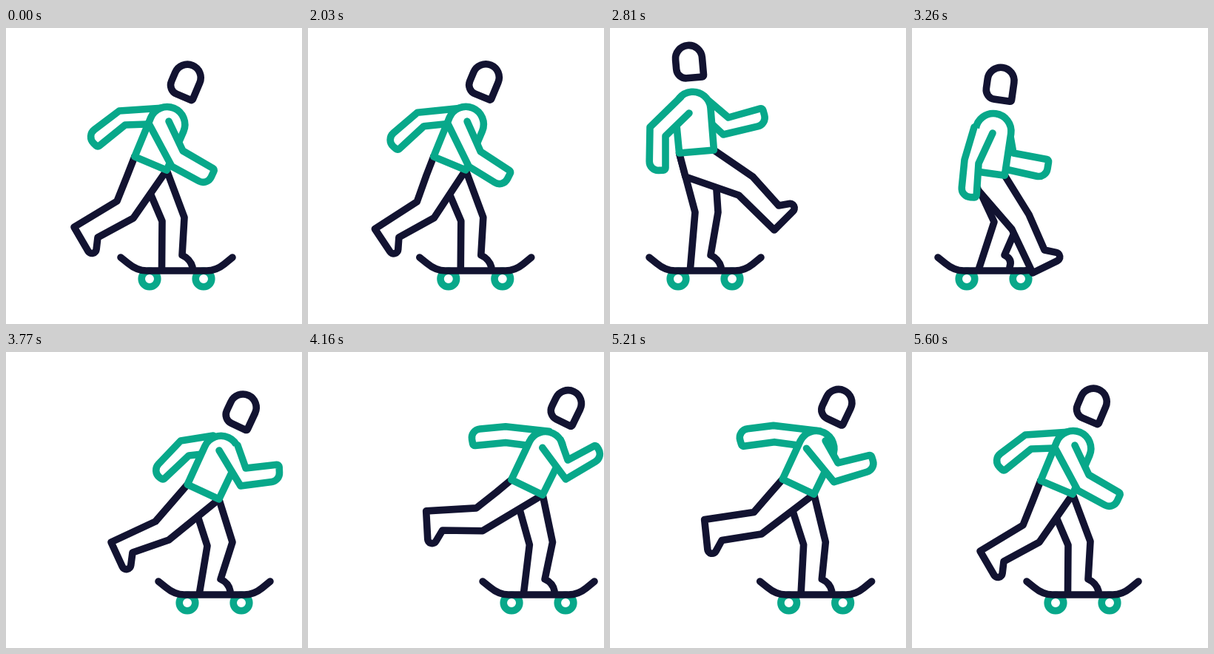
Recreate the animation shown at these times as an HTML page with a canvas. Size 400 by 400 pixels, loop 5660 ms.

```html
<!DOCTYPE html>
<html lang="en">
<head>
<meta charset="utf-8">
<title>Skateboarder</title>
<style>
  html, body { margin: 0; width: 100%; height: 100%; overflow: hidden; background: #fff; }
  canvas { display: block; width: 400px; height: 400px; }
</style>
</head>
<body>
<canvas id="stage" width="400" height="400"></canvas>
<script>
const ctx = document.getElementById('stage').getContext('2d');
const DARK = '#121331', GREEN = '#08a88a';
const LOOP = 5660, MOVE_START = 2030, MOVE_END = 5600, STEP = 30;
const CYCLE = 5;
const TORSO = 57, SHOULDER = 24, HIP = 23.5;

// Monotone cubic through (keys, values).
function spline(keys, values) {
  const last = keys.length - 1;
  const slope = i => (values[i + 1] - values[i]) / (keys[i + 1] - keys[i]);
  const tangents = keys.map((_, i) => {
    if (i === 0) return slope(0);
    if (i === last) return slope(last - 1);
    const a = slope(i - 1), b = slope(i);
    return a * b > 0 ? 2 * a * b / (a + b) : 0;
  });
  return x => {
    let i = 0;
    while (i < last - 1 && x >= keys[i + 1]) i++;
    const h = keys[i + 1] - keys[i], u = (x - keys[i]) / h, v = 1 - u;
    return v * v * (1 + 2 * u) * values[i] + u * v * v * h * tangents[i]
      + u * u * (3 - 2 * u) * values[i + 1] - u * u * v * h * tangents[i + 1];
  };
}

// Cyclic track of number rows, one row per key phase.
function track(phases, rows) {
  const n = phases.length;
  const keys = [phases[n - 1] - CYCLE, ...phases, CYCLE, phases[1] + CYCLE];
  const wrapped = [rows[n - 1], ...rows, rows[0], rows[1]];
  const curves = rows[0].map((_, c) => spline(keys, wrapped.map(row => row[c])));
  return p => curves.map(curve => curve(p));
}

const pairs = list => list.flatMap((x, i) => i % 2 ? [] : [[x, list[i + 1]]]);

const phaseAt = spline(
  [2000, 2570, 2810, 3140, 3260, 3770, 4280, 4730, 4880, 5420, 5600],
  [0, 0.85, 1, 1.27, 2, 3, 3.8, 4, 4.07, 4.72, 5]);
const boardAt = spline(
  [2000, 2300, 2570, 2810, 3070, 3260, 3440, 3600, 3770, 4000, 4350, 4730, 5080, 5420, 5600],
  [0, -42, -76, -102, -126, -120, -55, 18, 51, 74, 85, 80, 58, 27, 0]);

// Poses are in board coordinates: stride, kick, touch, push, glide.
const POSES = [0, 1, 2, 3, 4];
const bodies = [
  [195.5, 183, 23], [219, 167, -5], [222, 196, 8], [215.5, 189, 25], [214.5, 181.5, 26]
];
const bodyAt = track(POSES, bodies);

function shoulderOf([x, y, lean]) {
  const a = lean * Math.PI / 180;
  return [x + TORSO * Math.sin(a), y - TORSO * Math.cos(a)];
}

// Arms swing: elbow and hand points turn about the shoulder, ends just slide.
function armTrack(rows) {
  const isEnd = i => i === 0 || i === 5;
  const polar = track(POSES, rows.map((row, k) => {
    const [sx, sy] = shoulderOf(bodies[k]);
    return pairs(row).flatMap(([x, y], i) => {
      const dx = x - sx, dy = y - sy;
      return isEnd(i) ? [dx, dy] : [Math.atan2(dx, dy), Math.hypot(dx, dy)];
    });
  }));
  return (p, [sx, sy]) => pairs(polar(p)).map(([a, b], i) =>
    isEnd(i) ? [sx + a, sy + b] : [sx + b * Math.sin(a), sy + b * Math.cos(a)]);
}

// Shoulder end, elbow, hand, then back along the inner side.
const nearArmAt = armTrack([
  [194, 131, 224, 187, 272, 213, 282, 191, 239, 166, 220, 126],
  [198, 93, 156, 134, 155, 193, 177, 192, 177, 146, 209, 115],
  [204, 134, 191, 178, 186, 228, 207, 229, 210, 183, 229, 142],
  [237, 133, 266, 181, 319, 174, 318, 152, 273, 157, 262, 126],
  [234, 129, 267, 170, 316, 137, 305, 122, 269, 144, 258, 117]
]);
const farArmAt = armTrack([
  [213, 108, 153, 112, 108, 146, 124, 161, 161, 131, 190, 130],
  [240, 130, 255, 144, 314, 130, 308, 108, 262, 121, 235, 98],
  [225, 140, 238, 189, 301, 203, 305, 178, 257, 169, 251, 135],
  [229, 113, 185, 120, 146, 161, 161, 173, 196, 140, 214, 138],
  [250, 106, 185, 97, 137, 95, 139, 118, 183, 119, 216, 123]
]);

// Seat, back of knee, heel, toe, ankle, front of knee.
const nearLegAt = track([0, 0.5, 1, 2, 2.4, 3, 4], [
  [164, 199, 150, 234, 92, 269, 120, 317, 124, 283, 172, 257],
  [178, 200, 222, 240, 192, 292, 243, 306, 215, 275, 252, 225],
  [204, 201, 276, 226, 324, 273, 363, 234, 330, 240, 295, 201],
  [210, 220, 255, 272, 283, 331, 332, 307, 299, 300, 278, 252],
  [205, 222, 212, 272, 200, 345, 245, 362, 222, 325, 238, 262],
  [177, 199, 151, 229, 91, 257, 115, 309, 120, 271, 169, 254],
  [172, 188, 146, 208, 77, 208, 77, 266, 98, 236, 153, 239]
]);
// Back of knee, front of knee, ankle.
const farLegAt = track(POSES, [
  [211, 261, 241, 256, 238, 307],
  [217, 249, 248, 249, 238, 307],
  [231, 262, 262, 268, 245, 307],
  [221, 262, 255, 257, 239, 307],
  [217, 260, 247, 257, 239, 307]
]);

function paint(path, color, fill = '#fff') {
  ctx.strokeStyle = color;
  ctx.fillStyle = fill;
  ctx.beginPath();
  path();
  if (fill) ctx.fill();
  ctx.stroke();
}

// Open outline; radii maps a point index to its corner radius.
function outline(points, radii = {}) {
  points.forEach(([x, y], i) => {
    if (i === 0) ctx.moveTo(x, y);
    else if (radii[i]) ctx.arcTo(x, y, ...points[i + 1], radii[i]);
    else ctx.lineTo(x, y);
  });
}

function drawWheel(x) {
  paint(() => ctx.arc(x, 339, 10.8, 0, 2 * Math.PI), GREEN);
}

function drawBoard() {
  paint(() => {
    ctx.moveTo(155, 310);
    ctx.lineTo(165, 318);
    ctx.quadraticCurveTo(177, 328, 190, 328);
    ctx.lineTo(271, 328);
    ctx.quadraticCurveTo(284, 328, 295, 319);
    ctx.lineTo(306, 310);
  }, DARK, null);
}

function drawFarLeg(p, hipBack, hipFront) {
  const [kneeBack, kneeFront, ankle] = pairs(farLegAt(p));
  paint(() => {
    outline([[210.5, 325], kneeBack, hipBack, hipFront, kneeFront, ankle]);
    ctx.quadraticCurveTo(ankle[0] + 11, 312, 252, 323);
  }, DARK);
}

function drawArm(points) {
  paint(() => outline(points, { 2: 12, 3: 3 }), GREEN);
}

function drawTorso(shoulder, lean) {
  ctx.save();
  ctx.translate(...shoulder);
  ctx.rotate(lean * Math.PI / 180);
  paint(() => {
    ctx.moveTo(-HIP, TORSO);
    ctx.arc(0, 0, SHOULDER, Math.PI, 0);
    ctx.lineTo(HIP, TORSO);
    ctx.closePath();
  }, GREEN);
  paint(() => {
    ctx.moveTo(-17.5, -60);
    ctx.arc(0.5, -69, 18, Math.PI, 0);
    ctx.arcTo(18.5, -43, 0, -43, 2);
    ctx.arcTo(-17.5, -43, -17.5, -60, 13);
    ctx.closePath();
  }, DARK);
  ctx.restore();
}

function draw(p, shift) {
  const body = bodyAt(p), [x, y, lean] = body;
  const a = lean * Math.PI / 180;
  const shoulder = shoulderOf(body);
  const hip = side => [x + side * HIP * Math.cos(a), y + side * HIP * Math.sin(a)];
  const hipBack = hip(-1), hipFront = hip(1);

  ctx.fillStyle = '#fff';
  ctx.fillRect(0, 0, 400, 400);
  ctx.save();
  ctx.translate(shift, 0);
  ctx.lineWidth = 9.6;
  ctx.lineCap = ctx.lineJoin = 'round';
  drawWheel(194);
  drawWheel(267);
  drawFarLeg(p, hipBack, hipFront);
  drawBoard();
  paint(() => outline([hipBack, ...pairs(nearLegAt(p)), hipFront], { 4: 6 }), DARK);
  drawArm(farArmAt(p, shoulder));
  drawTorso(shoulder, lean);
  drawArm(nearArmAt(p, shoulder));
  ctx.restore();
}

function frame() {
  const t = performance.now() % LOOP;
  if (t < MOVE_START) {
    draw(0, 0);
  } else {
    const stepped = MOVE_START + Math.floor((t - MOVE_START) / STEP) * STEP;
    const time = Math.min(stepped, MOVE_END);
    draw(phaseAt(time), boardAt(time));
  }
  requestAnimationFrame(frame);
}
frame();
</script>
</body>
</html>
```
